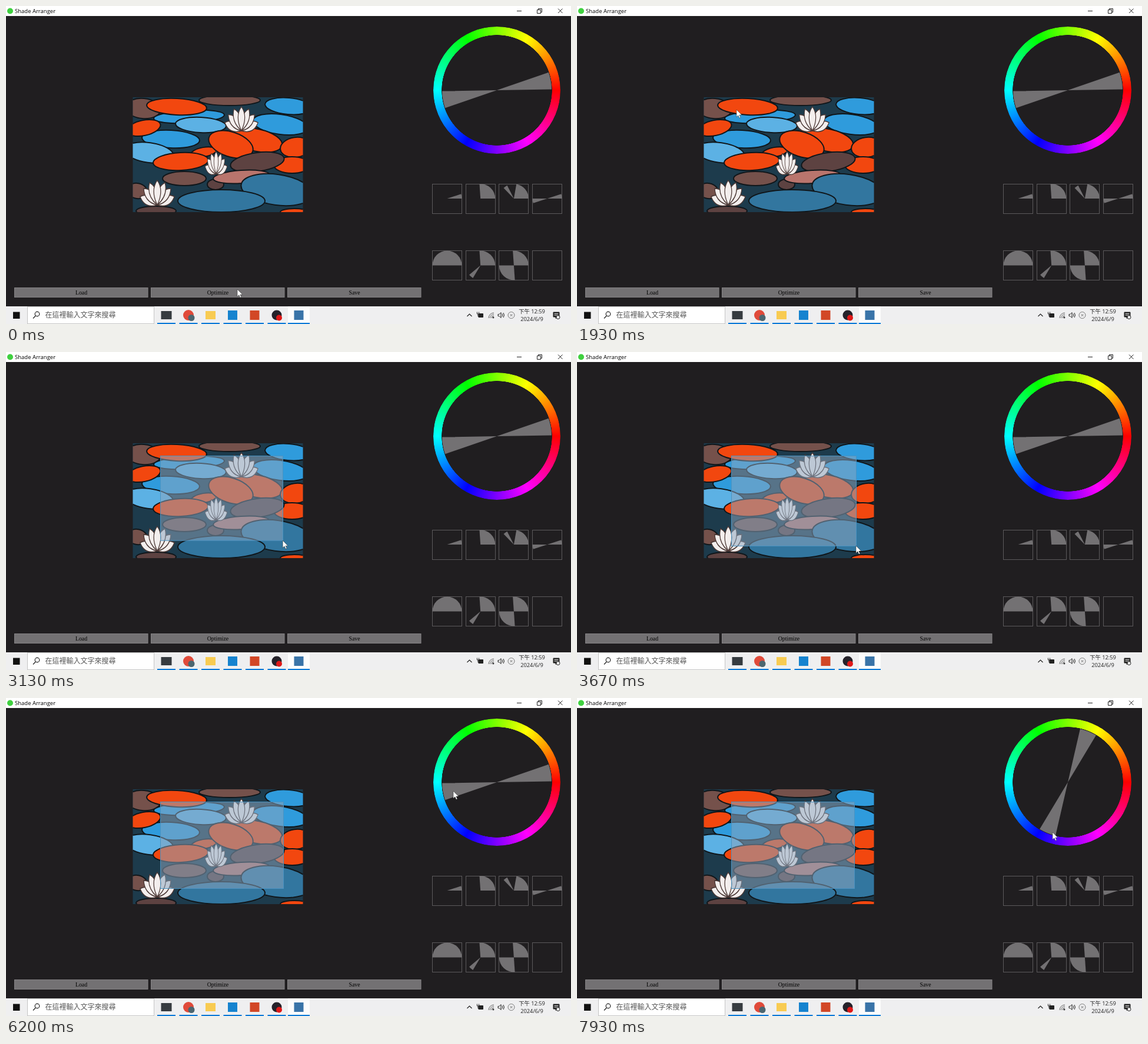
An HTML page for the animation above (8000 ms loop, 960 px wide and 540 px high).

```html
<!DOCTYPE html>
<html lang="zh-Hant">
<head>
<meta charset="utf-8">
<title>Shade Arranger</title>
<style>
  html, body { margin: 0; width: 100%; height: 100%; overflow: hidden; background: #201e20; }
  #ring {
    position: absolute; left: 726px; top: 35px; width: 216px; height: 216px; border-radius: 50%;
    background: conic-gradient(from 90deg, #f00, #f0f, #00f, #0ff, #0f0, #ff0, #f00);
    -webkit-mask: radial-gradient(circle, transparent 93.5px, #000 94px);
    mask: radial-gradient(circle, transparent 93.5px, #000 94px);
  }
  svg { position: absolute; left: 0; top: 0; }
  .ui { font-family: "Open Sans", "Noto Sans CJK TC", "Noto Sans CJK", sans-serif; }
  .button { font: 9.8px "Liberation Serif", serif; text-anchor: middle; }
  .line { fill: none; stroke: #222; }
</style>
</head>
<body>
<div id="ring"></div>
<svg width="960" height="540" viewBox="0 0 960 540">
  <defs><clipPath id="photoClip"><rect x="215.5" y="155" width="289" height="195"/></clipPath></defs>

  <rect width="960" height="17" fill="#fff"/>
  <circle cx="7" cy="8.5" r="5" fill="#3fd03f"/>
  <text class="ui" x="15" y="12" font-size="9.5">Shade Arranger</text>
  <path class="line" d="M868 8.5h8M902.5 6.5h6v6h-6zM904.5 6v-1.500h6v6h-2M938 4.500l7.500 7.500m0-7.500l-7.500 7.500"/>

  <g id="photo" clip-path="url(#photoClip)"><rect x="215" y="154" width="290" height="197" fill="#1d3b4c"/></g>
  <rect id="band" x="262.500" y="176.500" fill="#8ca8c0" fill-opacity=".52" stroke="#4b93c1"/>
  <g id="templates" fill="#737173"></g>
  <path id="wedges" fill="#737173"/>
  <g id="buttons"></g>

  <rect y="510" width="960" height="30" fill="#efeff0"/>
  <rect x="36.500" y="510.500" width="215" height="29" fill="#fff" stroke="#c4c4c4"/>
  <rect x="12" y="519.500" width="11.500" height="11.500" fill="#111"/>
  <circle class="line" cx="53" cy="523" r="3.800" stroke-width="1.200"/>
  <path class="line" d="M50.300 526l-4.300 4.500" stroke-width="1.200"/>
  <text class="ui" x="66.500" y="529.300" font-size="12" fill="#555">在這裡輸入文字來搜尋</text>
  <rect x="479" y="510" width="37" height="30" fill="#fcfcfc"/>
  <g id="tasks"></g>

  <g class="line">
    <path d="M783.500 527l4-4 4 4" stroke-width="1.200"/>
    <path d="M803 522.500h7.500v6h-7.500z" fill="#222"/>
    <path d="M800.500 519.500v3.500h3v-3.500M802 523v4h2"/>
    <path d="M820 530a9 9 0 0 1 9-9M822.500 530a6.500 6.500 0 0 1 6.500-6.500M825 530a4 4 0 0 1 4-4" stroke="#666"/>
    <circle cx="828" cy="529" r="1" fill="#222"/>
    <path d="M836 523.500h2l3-3v9l-3-3h-2zM843 522.500q2 2.500 0 5M845 521q3 4 0 8"/>
    <circle cx="858.500" cy="525" r="5.500" stroke="#777"/>
    <path d="M856.500 523l4 4m0-4l-4 4" stroke="#777"/>
    <path d="M930 520h10v8h-4l-2 2.500v-2.500h-4z" fill="#222"/>
    <path d="M931.500 522.500h7m-7 2.500h7" stroke="#eee"/>
    <circle cx="938" cy="528.500" r="3" fill="#efeff0"/>
  </g>
  <g class="ui" font-size="9.300" text-anchor="middle" fill="#222">
    <text x="893.500" y="521.500">下午 12:59</text>
    <text x="893.500" y="535">2024/6/9</text>
  </g>

  <path id="cursor" d="M0 0v12.500l2.900-2.700 2 4.500 2-.9-2-4.300h4z" fill="#fff" stroke="#222" stroke-width=".5"/>
</svg>
<script>
const get = id => document.getElementById(id);
const add = (id, markup) => get(id).insertAdjacentHTML('beforeend', markup);

// Sector with angles in degrees, counterclockwise from the right.
function sector(cx, cy, r, from, to) {
  const point = a => `${cx + r * Math.cos(a * Math.PI / 180)} ${cy - r * Math.sin(a * Math.PI / 180)}`;
  return `M${cx} ${cy}L${point(from)}A${r} ${r} 0 0 0 ${point(to)}Z`;
}

// Lily pads: x, y, rx, ry, tilt
const pads = {
  '#75514b': [[233, 174, 30, 17, 5], [380, 160, 52, 9, 0], [223, 314, 17, 13, 10], [303, 293, 37, 12, 0]],
  '#2f9bdc': [[311, 188, 60, 11, -3], [480, 170, 40, 14, 5], [466, 201, 47, 17, 8], [280, 226, 49, 15, 3]],
  '#5cb1e4': [[331, 202, 43, 13, 3], [243, 249, 42, 17, 8]],
  '#f2470f': [[290, 171, 51, 14, 3], [234, 207, 29, 13, -12], [336, 248, 22, 8, -10], [427, 228, 43, 19, 12],
    [382, 235, 39, 21, 18], [492, 240, 26, 17, -8], [297, 264, 47, 15, -3], [486, 270, 31, 14, 0], [490, 350, 24, 6, 0]],
  '#5d4241': [[427, 265, 46, 16, -8], [255, 348, 34, 8, 0], [356, 303, 14, 9, 0]],
  '#b9756d': [[400, 290, 48, 11, -4]],
  '#32769f': [[460, 312, 61, 26, 8], [366, 331, 74, 19, 0]]
};
for (const [color, list] of Object.entries(pads))
  for (const [x, y, rx, ry, tilt] of list)
    add('photo', `<ellipse rx="${rx}" ry="${ry}" transform="translate(${x} ${y}) rotate(${tilt})"
      fill="${color}" stroke="#10161a" stroke-width="2"/>`);

function flower(x, y, w, h) {
  for (const a of [-70, 70, -48, 48, -25, 25, 0])
    add('photo', `<path d="M0 0Q-.38-.6 0-1Q.38-.6 0 0" fill="#f3eeed" stroke="#4a3734" stroke-width=".04"
      transform="translate(${x} ${y}) scale(${w} ${h}) rotate(${a})"/>`);
}
flower(400, 212, 30, 41);
flower(357, 285, 20, 38);
flower(257, 338, 31, 42);

const templates = [
  [[0, 18]], [[0, 94]], [[0, 80], [117, 134]], [[0, 18], [180, 198]],
  [[0, 180]], [[0, 94], [220, 239]], [[0, 94], [180, 274]], []
];
templates.forEach((arcs, i) => {
  const x = 749 + i % 4 * 56.7, y = i < 4 ? 327 : 440.5;
  add('templates', `<rect x="${Math.round(x - 25) + .5}" y="${Math.floor(y - 25) + .5}" width="50" height="50"
    fill="none" stroke="#5c5a5c"/>` + arcs.map(([a, b]) => `<path d="${sector(x + .5, y, 25, a, b)}"/>`).join(''));
});

['Load', 'Optimize', 'Save'].forEach((label, i) => add('buttons',
  `<rect x="${14.5 + 232 * i}" y="478.500" width="226.500" height="16" fill="#737173" stroke="#858385"/>
   <text class="button" x="${128 + 232 * i}" y="490">${label}</text>`));

// Taskbar icons: colour, width, height, corner radius
[['#363b40', 18, 14, 0], ['#e04a3a', 18, 18, 9], ['#f8cb52', 17, 14, 0], ['#1683cf', 16, 16, 0],
 ['#d24726', 16, 16, 0], ['#25222a', 17, 17, 9], ['#3a74a8', 16, 16, 0]].forEach(([color, w, h, r], i) => {
  const x = 272.5 + 37.5 * i;
  add('tasks', `<rect x="${x - w / 2}" y="${525 - h / 2}" width="${w}" height="${h}" rx="${r}" fill="${color}"/>
    <rect x="${i === 6 ? 479 : x - 15.5}" y="538" width="${i === 6 ? 37 : 31}" height="2" fill="#0078d7"/>`);
});
add('tasks', '<circle cx="315" cy="529.500" r="5.500" fill="#4c6670"/><circle cx="464" cy="529.500" r="5" fill="#e01818"/>');

// Keys: time, values...
const cursorKeys = [
  [70, 393, 481], [500, 365, 370], [900, 325, 270], [1250, 296, 215], [1730, 288, 185], [1900, 271, 176],
  [1960, 271, 176], [2030, 262, 176], [2080, 262, 176], [2670, 448, 291], [2950, 468, 315], [3450, 474, 329],
  [3900, 474, 329], [4250, 471, 323], [4330, 471, 323], [4450, 477, 327], [5700, 477, 327],
  [5900, 620, 235], [6150, 760, 158], [6250, 760, 158], [6530, 760, 195], [7050, 781, 216],
  [7840, 781, 216], [7930, 808, 228]
];
const angleKeys = [[6250, 10], [6530, 46], [7050, 61.4], [7840, 61.4], [7930, 68]];
const PRESS = 2080, RELEASE = 4300, LAG = 14;

function sample(keys, t) {
  const i = keys.findIndex(key => key[0] > t);
  if (i === 0) return keys[0].slice(1);
  if (i < 0) return keys[keys.length - 1].slice(1);
  const a = keys[i - 1], b = keys[i], k = (t - a[0]) / (b[0] - a[0]);
  return a.slice(1).map((v, j) => v + (b[j + 1] - v) * k);
}

function render(t) {
  const [x, y] = sample(cursorKeys, t);
  get('cursor').setAttribute('transform', `translate(${x} ${y})`);

  const [right, bottom] = sample(cursorKeys, Math.min(t - LAG, RELEASE));
  const band = get('band');
  band.setAttribute('visibility', t > PRESS + LAG ? 'visible' : 'hidden');
  band.setAttribute('width', Math.max(0, right - 262));
  band.setAttribute('height', Math.max(0, bottom - 176));

  const [angle] = sample(angleKeys, t);
  get('wedges').setAttribute('d', [angle, angle + 180].map(a => sector(834, 143, 93, a - 9, a + 9)).join(''));
}

function frame() {
  render(performance.now() % 8000);
  requestAnimationFrame(frame);
}
frame();
</script>
</body>
</html>
```
